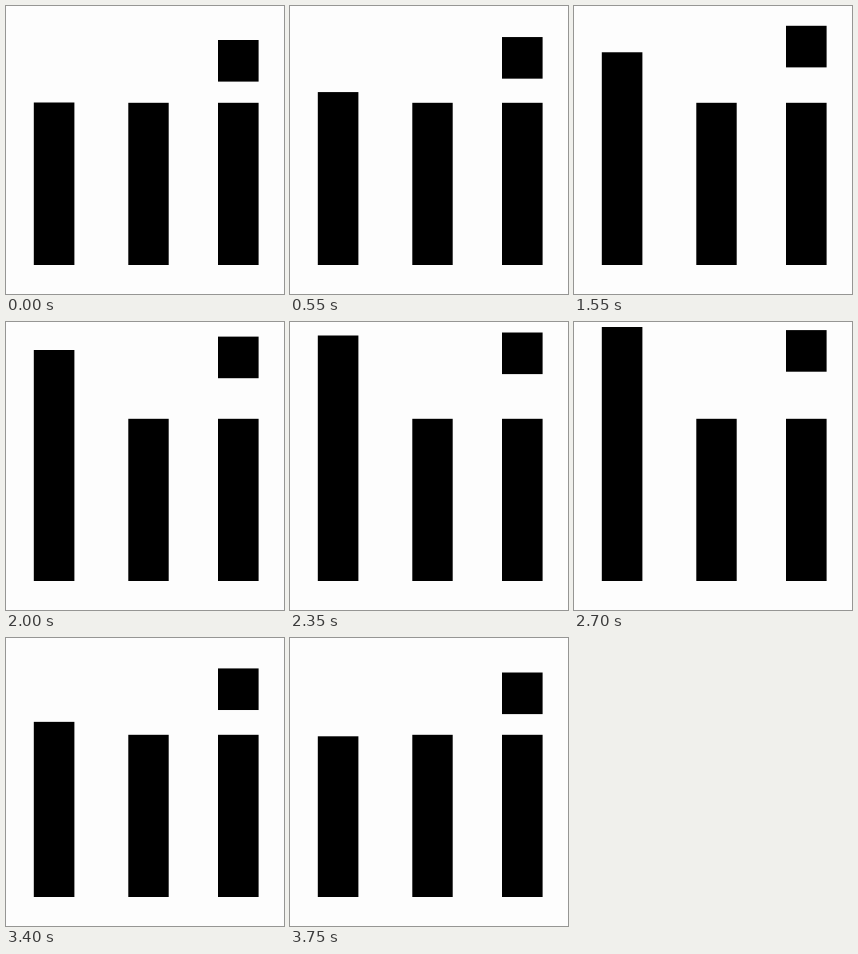
An HTML page for the animation above (4000 ms loop, 278 px wide and 288 px high).

```html
<!DOCTYPE html>
<html lang="en">
<head>
<meta charset="utf-8">
<title>Bars</title>
<style>
  html, body { margin: 0; height: 100%; overflow: hidden; background: #fdfdfd; }
  svg { display: block; }
</style>
</head>
<body>
<svg width="278" height="288" viewBox="0 0 278 288">
  <rect id="bar" x="27.8" width="40.6"/>
  <rect x="122.3" y="96.8" width="40.4" height="162.2"/>
  <rect x="212" y="96.8" width="40.6" height="162.2"/>
  <rect id="dot" x="212" width="40.6" height="41.6"/>
</svg>
<script>
const LOOP = 4000, STEP = 89, DELAY = 10, LAST = 42, BASE = 259;
const bar = document.getElementById('bar');
const dot = document.getElementById('dot');

// Top edge of the left bar: [step, y, slope]
const keys = [
  [0, 96.5, -0.3], [11, 69, -3.75], [22, 28, -3.5],
  [30, 5, -0.5], [34, 44, 13], [LAST, 98.3, 0.3]
];

// Cubic Hermite curve through the keys
function topAt(step) {
  const i = Math.max(1, keys.findIndex(key => step <= key[0]));
  const [k0, y0, m0] = keys[i - 1], [k1, y1, m1] = keys[i];
  const span = k1 - k0, u = (step - k0) / span, v = 1 - u;
  return y0 * v * v * (1 + 2 * u) + y1 * u * u * (1 + 2 * v)
    + span * u * v * (m0 * v - m1 * u);
}

function draw(now) {
  const step = Math.floor((now % LOOP - DELAY) / STEP);
  const top = topAt(Math.min(LAST, Math.max(0, step)));
  bar.setAttribute('y', top);
  bar.setAttribute('height', BASE - top);
  dot.setAttribute('y', 34 + (top - 96.5) * 0.283);
  requestAnimationFrame(draw);
}
draw(0);
</script>
</body>
</html>
```
